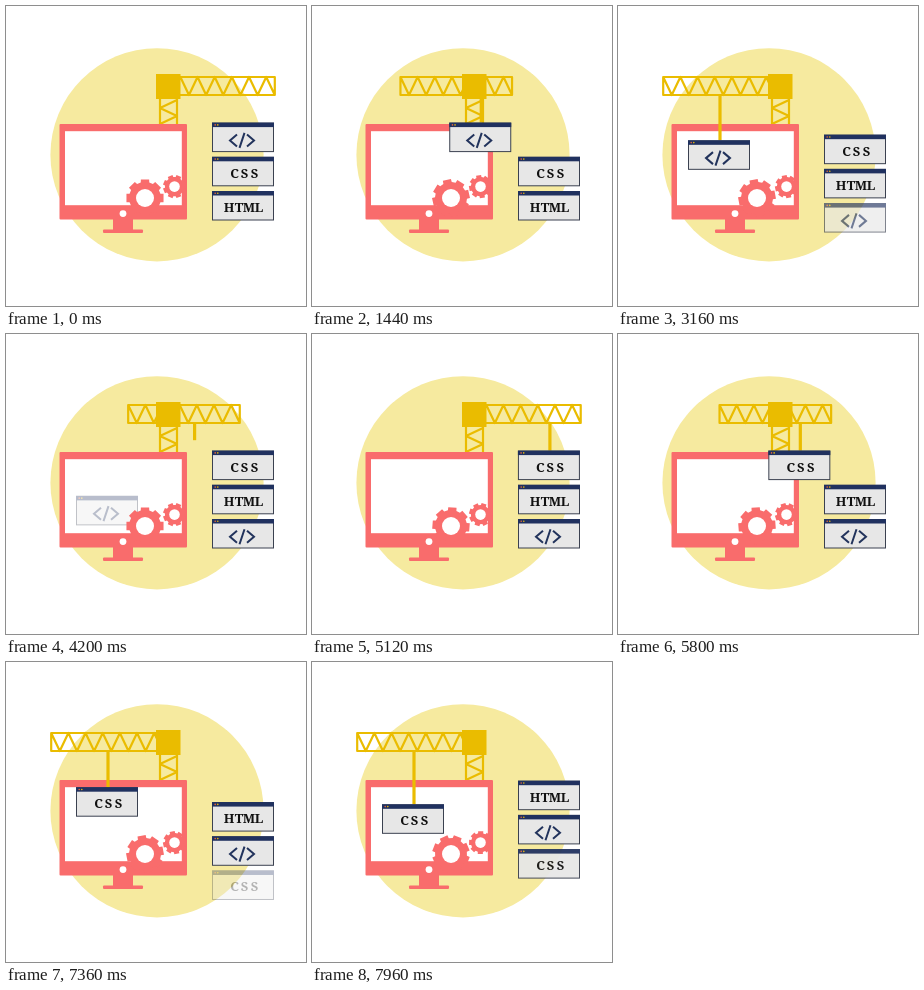
Recreate the animation shown at these times as an HTML page. Size 300 by 300 pixels, loop 8000 ms.

```html
<!DOCTYPE html>
<html lang="en">
<head>
<meta charset="utf-8">
<title>Crane building a web page</title>
<style>
  html, body { margin: 0; width: 100%; height: 100%; overflow: hidden; background: #fff; }
  svg { display: block; width: 100vw; height: 100vh; }
  .crane { fill: none; stroke: #eabc00; stroke-width: 2.2; stroke-linejoin: round; }
  .code { fill: none; stroke: #22335c; stroke-width: 2; }
  text { font: bold 13px "Noto Serif", "Liberation Serif", serif; text-anchor: middle; fill: #111; }
</style>
</head>
<body>
<svg viewBox="0 0 300 300">
  <defs>
    <g id="window">
      <rect x=".5" y=".5" width="61" height="28.5" fill="#e7e7e7" stroke="#3b4150"/>
      <rect width="62" height="4.5" fill="#20315f"/>
      <circle cx="3.2" cy="2.3" r=".8" fill="#e8663c"/>
      <circle cx="5.8" cy="2.3" r=".8" fill="#e9b90a"/>
    </g>
    <g id="tag">
      <use href="#window"/>
      <path class="code" d="M25 11.8L18 17.8L25 23.8M35 11.8L42 17.8L35 23.8M32.5 10.3L27.5 25.3"/>
    </g>
    <!-- one x per letter keeps the words on a monospaced grid -->
    <g id="css"><use href="#window"/><text x="22.5 32.5 42.5" y="21">CSS</text></g>
    <g id="html"><use href="#window"/><text x="17 27 37 47" y="21">HTML</text></g>
  </defs>

  <circle cx="151" cy="148.8" r="106.6" fill="#f6ea9f"/>

  <path class="crane" d="M154 92V118M171 92V118M171 94L154 102L171 110L154 118"/>
  <path class="crane" id="arm"/>
  <rect x="150" y="68" width="24.5" height="25" fill="#eabc00"/>

  <g fill="#f96c6c">
    <rect x="53.5" y="118" width="127.5" height="95.5" rx="1"/>
    <rect x="107" y="213" width="20" height="11"/>
    <rect x="97" y="223.5" width="40" height="3.5" rx="1"/>
  </g>
  <rect x="59" y="125.2" width="116.8" height="74" fill="#fff"/>
  <circle cx="117" cy="207.6" r="3.4" fill="#fff"/>

  <use class="stacked"/><use class="stacked"/><use class="stacked"/>
  <path class="crane" id="cable" style="stroke-width:3.2"/>
  <use id="carried"/>

  <g transform="translate(139 192)">
    <path class="gear" fill="#f96c6c"/><circle r="9" fill="#fff"/>
  </g>
  <g transform="translate(168.5 180.6)">
    <path class="gear" fill="#f96c6c"/><circle r="5.3" fill="#fff"/>
  </g>
</svg>

<script>
  const LOOP = 8000, CYCLE = 4520, TOOTH_TIME = 840;
  const REACH = 600, SWUNG = 1970, PLACED = 2540, LOWERED = 3500;
  const SLOT_X = 206, SLOT_Y = 116.6, SLOT_GAP = 34.2, DROP_Y = 144;
  const ids = ["tag", "css", "html"];
  const $ = s => document.querySelector(s);
  const arm = $("#arm"), cable = $("#cable"), carried = $("#carried");
  const stacked = document.querySelectorAll(".stacked");
  const gears = document.querySelectorAll(".gear");

  const part = (t, from, to) => Math.min(1, Math.max(0, (t - from) / (to - from)));
  const mix = (a, b, k) => a + (b - a) * k;
  const move = (el, x, y) => el.setAttribute("transform", `translate(${x} ${y})`);

  function gearPath(outer, root) {
    const points = [];
    for (let i = 0; i < 8; i++) {
      for (const [offset, r] of [[-.27, root], [-.22, outer], [.22, outer], [.27, root]]) {
        const a = i * Math.PI / 4 + offset;
        points.push(`${r * Math.sin(a)} ${-r * Math.cos(a)}`);
      }
    }
    return `M${points.join("L")}Z`;
  }
  gears[0].setAttribute("d", gearPath(19, 16));
  gears[1].setAttribute("d", gearPath(11.7, 9.6));

  const BRACES = 13;
  let truss = "M1.2 71H112.8V89H1.2ZM1.2 71";
  for (let i = 1; i <= BRACES; i++) truss += `L${mix(1.2, 112.8, i / BRACES)} ${i % 2 ? 89 : 71}`;
  arm.setAttribute("d", truss);

  function place(el, id, x, y, opacity) {
    el.setAttribute("href", "#" + id);
    el.setAttribute("opacity", opacity);
    move(el, x, y);
  }

  function draw(time) {
    const round = Math.floor(time / CYCLE), t = time % CYCLE;
    const reach = part(t, 0, REACH), swing = part(t, REACH, SWUNG);
    const slide = part(t, SWUNG, PLACED), lower = part(t, PLACED, LOWERED);
    const back = part(t, LOWERED, CYCLE);

    move(arm, mix(mix(156, 44, swing), 156, back), 0);

    const cardX = SLOT_X - 112 * swing - 24 * slide;
    const hangY = mix(SLOT_Y, DROP_Y, lower);
    const hookX = back ? mix(102, 228, back) : mix(228, 238, reach) + cardX - SLOT_X;
    const hookY = back ? mix(DROP_Y, 89, back) : reach < 1 ? mix(89, SLOT_Y, reach) : hangY;
    cable.setAttribute("d", `M${hookX} 89V${hookY}`);

    place(carried, ids[round % 3], cardX, hangY + 26 * back, 1 - back);
    stacked.forEach((el, i) => {
      const y = SLOT_Y + SLOT_GAP * (i + 1 - lower);
      place(el, ids[(round + i + 1) % 3], SLOT_X, y, i === 2 ? lower : 1);
    });

    const turn = 45 * time / TOOTH_TIME;
    gears[0].setAttribute("transform", `rotate(${turn})`);
    gears[1].setAttribute("transform", `rotate(${22.5 - turn})`);
  }

  const start = performance.now();
  function tick() {
    draw((performance.now() - start) % LOOP);
    requestAnimationFrame(tick);
  }
  tick();
</script>
</body>
</html>
```
